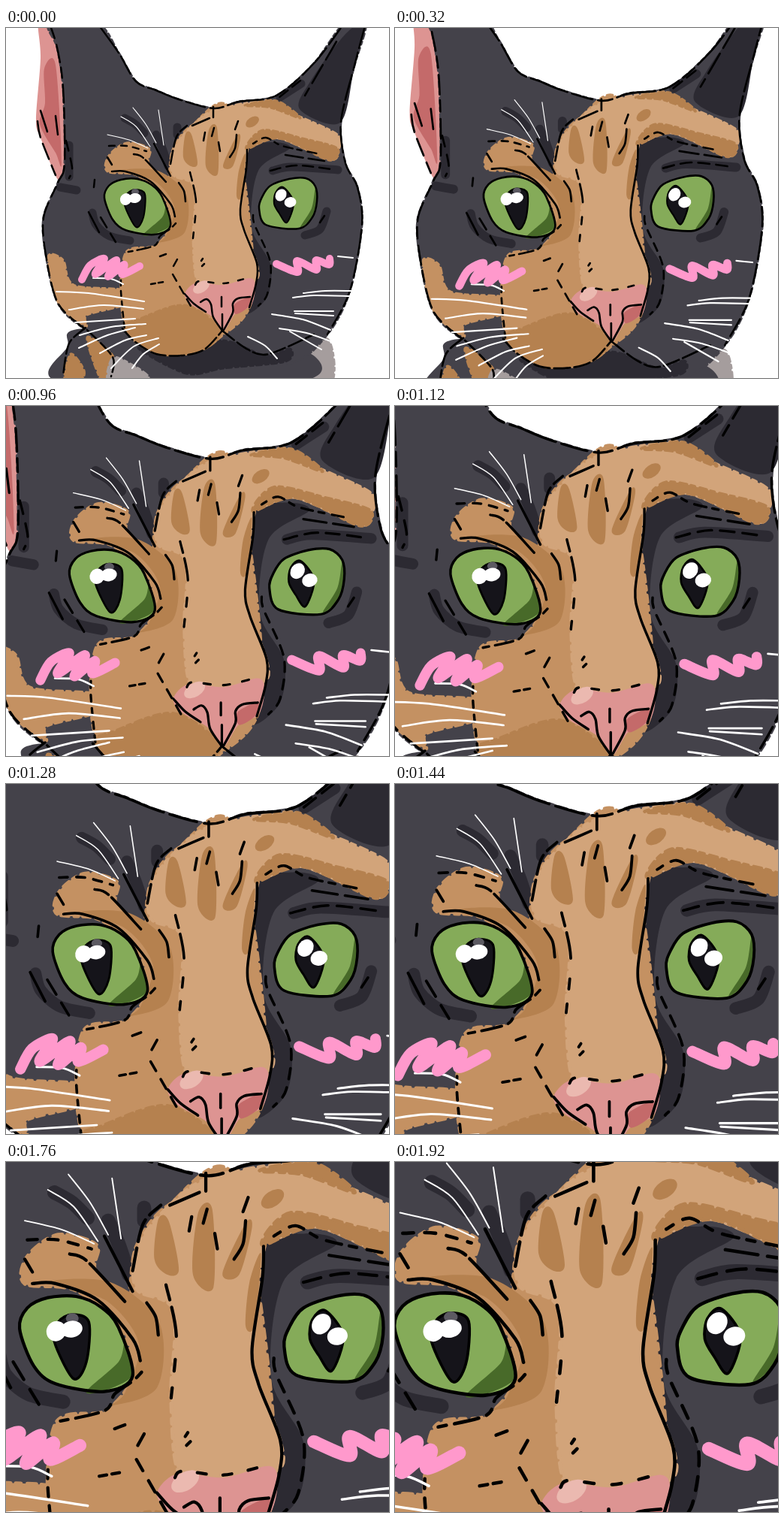
Animation, 510 px wide and 466 px high, one loop 1.96 s. Source, as an HTML page:

```html
<!DOCTYPE html>
<html lang="en">
<head>
<meta charset="utf-8">
<title>Cat zoom</title>
<style>
  html, body { margin: 0; width: 100%; height: 100%; overflow: hidden; background: #fff; }
  svg { display: block; width: 100%; height: 100%; }
</style>
</head>
<body>
<svg id="cat" viewBox="0 0 510 466" stroke-linecap="round" stroke-linejoin="round"></svg>
<script>
const WIDTH = 510, HEIGHT = 466;
const FRAME = 40, FRAMES = 49;
const FOCUS = { x: 290, y: 232 };
const END_CROP = 0.547;

const FUR = '#44424a', SHADOW = '#2c2a32', INK = '#000';
const TAN = '#d2a47a', AMBER = '#c49162', BROWN = '#b5814f';
const PINK = '#dd9492', ROSE = '#c46a6a', BLUSH = '#ff99cc';
const GREEN = '#85ab59', MOSS = '#486a29', GREY = '#a59d9d', WHITE = '#fff';

const svg = document.getElementById('cat');

function add(tag, attrs) {
  const node = document.createElementNS('http://www.w3.org/2000/svg', tag);
  for (const name in attrs) node.setAttribute(name, attrs[name]);
  svg.appendChild(node);
}

// Catmull-Rom curve through "x y x y ..." points.
function curve(text, closed) {
  const n = text.split(' ').map(Number);
  const pts = [];
  for (let i = 0; i < n.length; i += 2) pts.push([n[i], n[i + 1]]);
  const count = pts.length;
  const at = i => closed ? pts[(i + count) % count] : pts[Math.max(0, Math.min(count - 1, i))];
  let d = 'M' + pts[0];
  for (let i = 0; i < (closed ? count : count - 1); i++) {
    const [a, b, c, e] = [at(i - 1), at(i), at(i + 1), at(i + 2)];
    const out = b.map((v, k) => (v + (c[k] - a[k]) / 6.5).toFixed(2));
    const into = c.map((v, k) => (v - (e[k] - b[k]) / 6.5).toFixed(2));
    d += `C${out} ${into} ${c}`;
  }
  return d + (closed ? 'Z' : '');
}

const shape = (fill, points, extra) => add('path', { d: curve(points, true), fill, ...extra });

// Patch with a tufted edge.
const fur = (fill, points) =>
  shape(fill, points, { stroke: fill, 'stroke-width': 3, 'stroke-dasharray': '4 5 7 4' });

const line = (stroke, width, points, dash = 'none') => add('path', {
  d: curve(points), fill: 'none', stroke, 'stroke-width': width, 'stroke-dasharray': dash
});
const ink = (points, dash) => line(INK, 2.5, points, dash);
const shade = (points, width = 11) => line(SHADOW, width, points);
const whisker = (points, width = 2) => line(WHITE, width, points);

const blob = (fill, cx, cy, rx, ry, turn = 0) =>
  add('ellipse', { cx, cy, rx, ry, fill, transform: `rotate(${turn} ${cx} ${cy})` });

const crown = '122 -6 150 33 173 71 200 83 230 95 277 107 310 98 360 90 410 47 450 -6';
const rightSide = '479 -6 464 50 446 125 452 180 468 212 474 262 458 350 428 408';
const leftSide = '104 400 69 366 53 302 50 252 69 206 78 180 76 80 68 26 58 -6';
const noseEdge = '321 162 320 187 312 242 317 269 334 313 333 340 324 372';
const jaw = '155 400 172 418 200 434 234 436 264 428 288 403';

function drawBody() {
  shape(PINK, '43 -6 57 -6 73 40 80 200 69 202 46 146 40 122 46 40');
  shape(ROSE, '51 54 66 49 74 178 66 166 45 128 52 100');
  fur(GREY, '428 414 433 472 370 472 384 445');
  shape(FUR, '102 400 82 424 76 472 380 472 412 438 300 400');
  fur(FUR, `${crown} ${rightSide} 380 446 290 440 170 434 ${leftSide}`);
  fur(BROWN, '86 434 104 456 98 472 78 472');
  fur(BROWN, '108 412 142 436 139 460 128 472');
  fur(GREY, '140 442 154 441 190 466 138 472');
  fur(SHADOW, '176 426 234 438 288 416 345 436 378 427 372 444 290 453 240 460');
}

function drawShadows() {
  shape(SHADOW, '452 8 406 70 391 108 445 126 464 50 477 -4');
  shade('365 92 393 74');
  shade('84 156 84 198');
  shade('72 212 94 216');
  shade('115 246 120 262 138 277 165 283');
  shade('158 120 172 128 184 140');
  shade('200 142 208 160 216 184');
  shade('228 132 228 142');
  shade('355 190 380 185 442 189');
  shade('398 276 418 268 427 244');
  shape(SHADOW, '321 164 354 152 378 160 336 190 327 265 352 314 348 358 320 380 333 330 312 242');
}

function drawTan() {
  fur(AMBER, '56 305 76 309 90 342 156 349 158 368 108 382 106 397 70 366');
  fur(AMBER, '135 191 137 170 161 153 191 161 190 181 214 203 222 162 247 130 300 112 330 345 284 413 234 435 174 419 154 374 159 300 198 290 219 262 209 224 174 196');
  shape(BROWN, '152 190 198 204 224 238 213 276 202 286 238 272 240 222 202 190');
  fur(BROWN, '158 399 176 388 238 369 285 402 262 428 202 434');
  fur(TAN, '278 109 340 97 360 98 376 111 440 141 443 162 431 175 364 147 330 157 321 165 312 242 317 269 334 314 332 336 290 343 256 340 249 280 251 212 222 195 223 162 247 131');
  fur(BROWN, '318 103 360 97 392 120 352 106');
  fur(BROWN, '320 161 342 136 395 147 441 160 430 176 364 147');
  shape(BROWN, '239 141 247 142 255 180 246 184 236 172');
  shape(BROWN, '270 136 281 133 282 194 266 184');
  shape(BROWN, '307 144 312 147 302 184 289 183');
  blob(BROWN, 328, 125, 10, 6, -35);
  shape(BROWN, '310 190 319 168 314 223 307 224');
}

function drawEyes() {
  const left = '131 226 137 210 153 202 175 201 194 209 208 225 219 263 197 275 159 269 142 255';
  const right = '337 240 341 225 352 210 377 201 399 200 412 211 414 231 408 252 390 267 346 262';
  const rim = { stroke: INK, 'stroke-width': 2.5 };
  shape(GREEN, left);
  shape(MOSS, '213 238 219 262 198 274 183 275 208 252');
  shape(GREEN, right);
  shape(MOSS, '412 213 414 232 407 253 392 265 407 240');
  shape('none', left, rim);
  shape('none', right, rim);
  const pupil = { stroke: INK, 'stroke-width': 2 };
  shape('#15141a', '172 215 185 221 183 252 173 265 158 236 161 221', pupil);
  shape('#15141a', '369 212 383 232 374 259 364 247 357 234 359 219', pupil);
  blob('#5c5a62', 172, 218, 5, 4);
  blob(WHITE, 159.5, 228, 7.5, 8, 30);
  blob(WHITE, 171.5, 226.5, 8.5, 6.5, -10);
  blob(WHITE, 366, 222.5, 7, 8.5, 35);
  blob(WHITE, 378.5, 232, 8, 6.8, -15);
}

function drawNose() {
  shape(PINK, '238 354 254 339 290 342 325 333 332 345 326 370 305 381 289 404 274 384 248 369');
  shape(ROSE, '304 368 325 358 322 372 306 381');
  blob('#ebb9b0', 260, 345, 12, 7, -32);
  ink('259 365 267 361 273 368 276 385 288 403');
  ink('325 358 309 360 302 367 302 379 290 402');
  ink('238 354 250 367 266 378');
  ink('287 358 287 371');
  ink('288 381 288 403');
  ink('252 342 258 337 290 340 325 332', '7 13');
}

function drawOutline() {
  ink(crown, '48 6 26 7 18 6');
  ink(rightSide, '34 6 24 7');
  ink(leftSide, '24 9 14 7');
  ink(noseEdge);
  ink(jaw, '20 5');
  ink('288 403 322 428 350 434 410 408', '20 5');
  ink('106 399 84 420 76 462', '20 5');
  ink('108 402 142 438 140 464', '20 5');
  ink('440 18 398 90', '28 8');
  ink('392 70 364 92', '14 7');
  ink('46 110 55 138');
  ink('66 117 69 142');
  ink('42 124 46 146 66 196', '22 9');
  ink('80 150 88 186 84 200', '14 10');
}

function drawEyeLines() {
  ink('141 191 159 191 192 204 219 234 225 251');
  ink('170 168 183 173 213 205', '14 4 40');
  ink('197 154 219 197');
  ink('219 181 227 145 241 130', '18 5');
  ink('248 130 271 120');
  ink('276 105 276 119');
  ink('230 206 237 217 239 231');
  ink('245 192 253 231 249 280', '12 6 23 18 9 13');
  ink('135 172 141 182');
  ink('137 157 161 157 187 164', '8 8');
  ink('226 260 219 267 205 277 197 290 158 299', '6 6 18 6');
  ink('110 245 124 272');
  ink('126 252 146 285', '16 9');
  ink('118 202 117 212');
  ink('424 250 418 259');
}

function drawMarks() {
  ink('265 139 263 150');
  ink('277 133 274 144');
  ink('283 152 285 164');
  ink('309 124 305 135');
  ink('307 142 305 160 298 172');
  ink('228 308 223 317');
  ink('205 304 213 301');
  ink('193 341 210 338', '6 4');
  ink('222 328 246 370', '10 9');
  ink('262 307 260 310');
  ink('264 314 261 317');
  ink('329 154 346 146 368 157 414 167', '6 8 12 6');
  ink('352 190 386 183 434 188', '14 8');
  ink('372 169 424 177', '24 7');
  ink('329 249 331 262 352 312 348 354 336 370', '10 8');
  ink('154 322 153 350 158 402', '7 7');
}

function drawLeftWhiskers() {
  whisker('67 351 110 353 184 364');
  whisker('84 375 130 369 183 374');
  whisker('92 392 172 387');
  whisker('98 409 140 398 186 394');
  whisker('97 426 135 409 172 399');
  whisker('125 433 158 416 187 409');
  whisker('140 453 170 424 203 413');
  whisker('168 453 183 434 204 421');
  whisker('116 333 140 334 156 341');
  whisker('169 106 186 128 200 153', 1.1);
  whisker('203 109 210 156', 1.1);
  whisker('135 142 164 149 189 160', 1.1);
  whisker('153 118 173 131 192 158', 1.1);
}

function drawRightWhiskers() {
  whisker('382 359 410 356 459 357');
  whisker('396 353 425 350 460 350');
  whisker('384 377 436 377');
  whisker('385 380 436 383');
  whisker('354 381 395 388 432 402');
  whisker('364 400 400 406 432 417');
  whisker('378 404 420 428');
  whisker('322 411 345 423 361 440');
  whisker('442 304 462 306');
}

function drawBlush() {
  line(BLUSH, 10, '101 335 112 316 131 307 119 328 147 309 136 331 157 315 155 328 178 317');
  line(BLUSH, 10, '360 314 388 325 388 310 413 322 413 309 430 315 431 307');
}

[drawBody, drawShadows, drawTan, drawEyes, drawNose, drawOutline, drawEyeLines, drawMarks,
  drawLeftWhiskers, drawRightWhiskers, drawBlush].forEach(draw => draw());

// The crop window shrinks linearly around a fixed point.
function render(ms) {
  const step = Math.floor(ms / FRAME) % FRAMES;
  const crop = 1 - (1 - END_CROP) * step / (FRAMES - 1);
  const box = [FOCUS.x * (1 - crop), FOCUS.y * (1 - crop), WIDTH * crop, HEIGHT * crop];
  svg.setAttribute('viewBox', box.map(v => v.toFixed(3)).join(' '));
}

const start = performance.now();
function tick() {
  render(performance.now() - start);
  requestAnimationFrame(tick);
}
tick();
</script>
</body>
</html>
```
